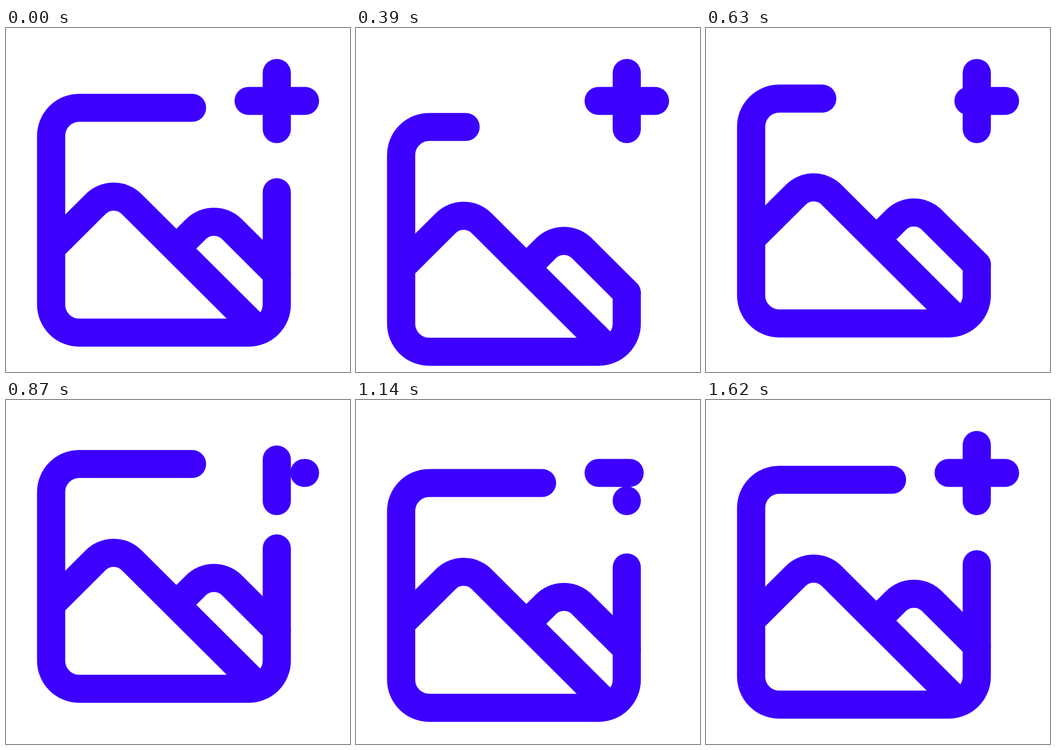
Write an HTML page that moves like this. It is 747x750 px and loops after 3.25 s.

```html
<!DOCTYPE html>
<html lang="en">
<head>
<meta charset="utf-8">
<title>Add image icon</title>
<style>
  html, body { margin: 0; width: 100%; height: 100%; overflow: hidden; background: #fff; }
  svg { display: block; width: 100%; height: 100%; }
  path { fill: none; stroke: #3d00ff; stroke-width: 61.2; }
  .round { stroke-linecap: round; }
</style>
</head>
<body>
<svg viewBox="0 0 747 750">
  <g id="picture">
    <path id="frame" class="round"/>
    <path id="side" class="round"/>
    <path d="M98 480.5L194.9 383.6A55 55 0 0 1 272.6 383.6L540 651"/>
    <path d="M370 481L412.6 438.4A55 55 0 0 1 490.4 438.4L588 536"/>
  </g>
  <path id="across" class="round"/>
  <path id="upright" class="round"/>
</svg>
<script>
  const LOOP = 3250, STEP = 30, ACTIVE = 1620;
  const BAR = 122.4, LEFT = 526.9, TOP = 98;
  const $ = id => document.getElementById(id);
  const [picture, frame, side, across, upright] =
    ['picture', 'frame', 'side', 'across', 'upright'].map($);

  const BOB = [[0, 0], [408, 42], [745, -43], [1265, 15.5], [1508, 0]];
  const RETRACT = [[0, 0], [540, 1], [810, 0]];

  // Progress from a to b, eased in and out
  function ease(t, a, b) {
    const u = Math.min(1, Math.max(0, (t - a) / (b - a)));
    return u * u * (3 - 2 * u);
  }

  function track(t, keys) {
    let value = keys[0][1];
    for (let i = 1; i < keys.length; i++) {
      const [a, from] = keys[i - 1], [b, to] = keys[i];
      value += (to - from) * ease(t, a, b);
    }
    return value;
  }

  // A bar shrinks towards its far end, then grows again from its near end
  function bar(t, start) {
    const mid = start + 450;
    return t < mid
      ? [BAR * ease(t, start, mid), BAR]
      : [0, BAR * ease(t, mid, mid + 450)];
  }

  function setBar(el, [a, b], path) {
    el.setAttribute('d', b - a > 0.01 ? path(a, b) : '');
  }

  function draw(t) {
    const pull = track(t, RETRACT);
    const tip = 404 - 204.6 * pull;
    const sideTip = 358 + Math.min(178, 242 * pull);

    picture.setAttribute('transform', `translate(0 ${track(t, BOB).toFixed(2)})`);
    frame.setAttribute('d', `M${tip} 174H159.2A61.2 61.2 0 0 0 98 235.2V603` +
      'A61.2 61.2 0 0 0 159.2 664.2H526.8A61.2 61.2 0 0 0 588 603V536');
    side.setAttribute('d', `M588 536.1V${sideTip}`);
    setBar(across, bar(t, 450), (a, b) => `M${LEFT + a} 159H${LEFT + b}`);
    setBar(upright, bar(t, 720), (a, b) => `M588 ${TOP + a}V${TOP + b}`);
  }

  const begin = performance.now();
  function tick() {
    const t = (performance.now() - begin) % LOOP;
    draw(Math.min(ACTIVE, Math.floor(t / STEP) * STEP));
    requestAnimationFrame(tick);
  }
  tick();
</script>
</body>
</html>
```
